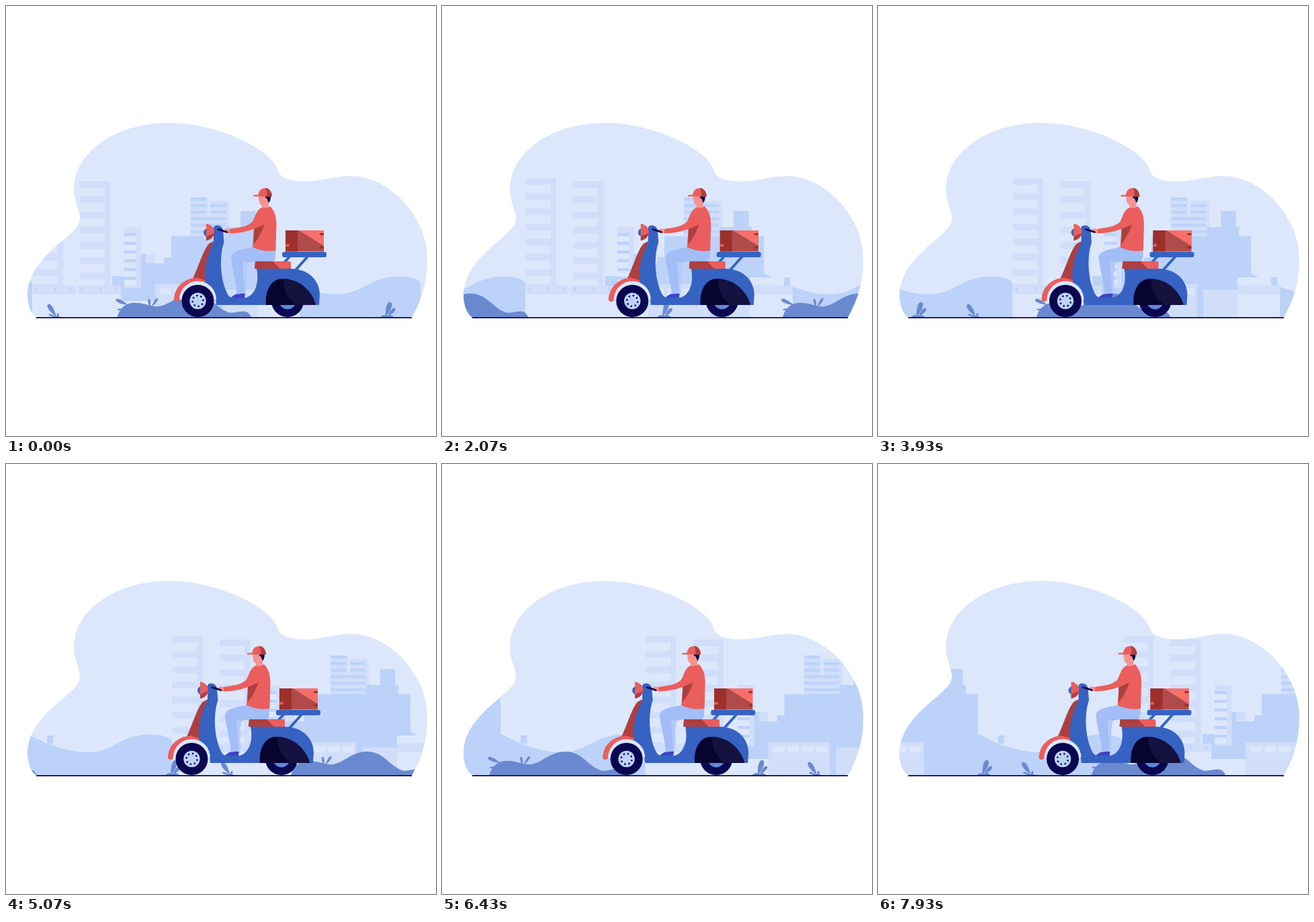
These frames come from a looping animation (640 by 640 pixels, 8000 ms). An HTML page:

```html
<!DOCTYPE html>
<html lang="en">
<head>
<meta charset="utf-8">
<title>Scooter delivery</title>
<style>
  html, body { margin: 0; width: 100%; height: 100%; overflow: hidden; background: #fff; }
  svg { display: block; width: 100vw; height: 100vh; }
</style>
</head>
<body>
<svg viewBox="0 0 640 640">
  <defs>
    <clipPath id="cloudClip"><path id="cloud" d="M45 463.5C36 457 32 443 32 430C32 397 58 371 86 348C100 335 110 328 110 316C110 304 101 292 101 272C101 222 158 174 242 174C318 174 399 216 405 246C409 258 427 261 445 261C470 261 490 253 515 253C545 253 590 275 614 324C622 339 627 358 627 378C627 410 619 437 604 463.5Z"/></clipPath>
  </defs>
  <use href="#cloud" fill="#dce7fc"/>
  <g clip-path="url(#cloudClip)">
    <g id="city"></g>
    <g id="plants" fill="#6b89d0"></g>
  </g>
  <path d="M45 463.8H604" stroke="#0a0440" stroke-width="1.7"/>
  <g clip-path="url(#cloudClip)"><path id="dash" d="M12 464H60" stroke="#0a0440" stroke-width="2"/></g>

  <g id="scooter">
    <circle cx="419" cy="439" r="24" fill="#0b0650"/>
    <circle cx="419" cy="439" r="12.5" fill="#5f86d8"/>
    <path d="M449 373L431 393M422 373L413 383" stroke="#3662c1" stroke-width="4"/>
    <!-- fender and front -->
    <path d="M277 408C285 392 294 362 302 354L309 350L304 414Q288 404 277 408Z" fill="#ae3f40"/>
    <path d="M254 436C255 419 270 408.5 284 408.5L296 412" fill="none" stroke="#ea5e5d" stroke-width="8" stroke-linecap="round"/>
    <!-- body -->
    <path d="M309 330Q310 326 315 326.5Q321 327 323 333L324.5 352C319 366 317 400 328 425Q331 434 338 434H357C372 430 377 410 373 391H423C450 391 467 408 467 430L466 445H313C313 432 305 420 297 412C293 395 299 370 309 352Z" fill="#3662c1"/>
    <path d="M258 437A27.5 27.5 0 0 1 313 437Z" fill="#dce7fc"/>
    <path d="M387 445C385 425 394 406 411 406C440 406 457 428 461 445Z" fill="#07042f"/>
    <path d="M414 406C440 408 457 428 461 445H432C418 434 411 420 414 406Z" fill="#15123f"/>
    <circle cx="285.5" cy="439" r="24" fill="#0b0650"/>
    <circle cx="285.5" cy="439" r="12.2" fill="#bcd2f9"/>
    <g id="bolts" fill="#0b0650"></g>
    <!-- headlight -->
    <circle cx="300" cy="337" r="6" fill="#3662c1"/>
    <path d="M298 324C305 325 310 330 310 336C310 343 305 348 298 349Z" fill="#ea5e5d"/>
    <path d="M298 349V343L309.500 338C309 344 304 348 298 349Z" fill="#ae3f40"/>
    <!-- seat, rack and box -->
    <path d="M371 380H422Q424 380 424 382V391H370Z" fill="#ea5e5d"/>
    <path d="M371 380H397L408 391H370Z" fill="#ae3f40"/>
    <rect x="411" y="366" width="66" height="8" rx="3" fill="#3662c1"/>
    <rect x="416" y="334" width="57" height="31.500" fill="#b04b4b"/>
    <path d="M436 334H473V357Z" fill="#f86f69"/>
    <path d="M416 334H434V365.500H416ZM467 338H473V341H467ZM467 357.500H473V361H467Z" fill="#9e302c"/>
    <path d="M416 354.500H421.500V358H416Z" fill="#ea5e5d"/>
    <!-- legs and shoe -->
    <path d="M335 434Q339 430 344 428H356L355 434Z" fill="#3b45c6"/>
    <path d="M367 359C350 362 334 365 335 375C336 390 343 410 344 429L357 427C358 412 356 395 360 382L371 380H399Q402 372 401 362Z" fill="#a3bdf6"/>
    <path d="M352 381L355 428L357 427C358 412 356 395 360 381Z" fill="#b3cafa"/>
    <!-- rider -->
    <path d="M376 283H391V298Q387 303 381 301V297C377 295 376 289 376 283Z" fill="#f5938f"/>
    <path d="M386 283H394Q394 290 391 293L389 288H386Z" fill="#0b0650"/>
    <circle cx="387" cy="287.500" r="1.800" fill="#f5938f"/>
    <path d="M368 281.500L375.500 281C376 275 380 271 386 271C392 271 396 277 396 283.500H368Z" fill="#ea5e5d"/>
    <path d="M386 271C392 271 396 277 396 283.500H388Q389 276 386 271Z" fill="#ae3f40"/>
    <path d="M333 332C345 330 358 329 366 322C371 316 371 304 381 300Q387 302 393 298C400 305 402.500 314 402.500 325L401.500 364Q384 367 367 359L369 332Q352 338 333 338.500Z" fill="#ea5e5d"/>
    <path d="M369 332L384.500 325.500Q379 342 368.500 355Z" fill="#ae3f40"/>
    <path d="M324 333Q328 330 333 332V338.500L325 337Z" fill="#f5938f"/>
    <path d="M316 332.500L329 336.500" stroke="#0b0650" stroke-width="2.800" stroke-linecap="round"/>
  </g>
</svg>
<script>
const LOOP = 8000, PERIOD = 578;
const BACK = '#dce7fc', PALE = '#d0defa', MID = '#bcd2f9';
const el = id => document.getElementById(id);
const rect = (x, y, right, bottom, fill) =>
  `<rect x="${x}" y="${y}" width="${right - x}" height="${bottom - y}" fill="${fill}"/>`;
const repeat = (count, draw) => Array.from({ length: count }, (_, i) => draw(i)).join('');
const group = (x, content) => `<g transform="translate(${x} 0)">${content}</g>`;

const hill = `<path fill="${MID}" d="M390 463V396C430 417 460 429 493 429C530 429 540 403 585 402.500C600 402.500 617 406 617 414V463Z"/>`;

const tower = (x, y) => rect(x, y, x + 45.5, 416, PALE) +
  repeat(7, i => rect(x, y + 10 + i * 22.6, x + 37, y + 22.4 + i * 22.6, BACK));

const fence = x => rect(x, 416, x + 64, 429, PALE) +
  [5, 33, 55].map(dx => rect(x + dx, 419, x + dx + 2.5, 424, MID)).join('');

// Blocks behind, then the striped towers, then the low buildings.
function skyline(withShops) {
  let out = tower(39.5, 256) + tower(110, 261) + fence(39.5) + fence(107);
  out += rect(275, 285, 301, 342, PALE) + rect(304, 290, 332, 342, PALE) + rect(300, 314, 305, 342, PALE);
  out += repeat(6, i => {
    const y = 285 + i * 9.8;
    if (i > 2) return rect(275, y, 327, y + 4, MID);
    return rect(275, y, 298, y + 4.5, MID) + (i ? rect(304, y, 327, y + 4, MID) : '');
  });
  out += rect(158, 402, 176, 416, MID) + rect(171, 416, 222, 439, MID) +
    rect(194, 369, 209, 439, MID) + rect(208, 369, 222, 383, PALE) +
    rect(208, 383, 246, 439, MID) + rect(235, 374, 247, 420, MID) +
    rect(246, 342.500, 394, 463, MID) + rect(328, 329, 376, 344, MID) + rect(349, 305, 371.500, 330, MID);
  out += rect(176, 329, 201, 420, PALE) +
    repeat(6, i => rect(176, 338 + i * 13, 194, 342.500 + i * 13, MID) +
      rect(176, 342.500 + i * 13, 194, 351 + i * 13, BACK));
  out += rect(222, 414, 313.500, 463, PALE) +
    repeat(4, i => rect(229 + i * 21.3, 420, 246 + i * 21.3, 429.500, BACK));
  if (withShops) {
    out += rect(323, 422, 374, 463, PALE) + rect(374, 404, 437, 463, BACK) + rect(374, 415.500, 437, 429, PALE);
  }
  return out + rect(424, 404, 433, 416, MID);
}

// Teardrop leaf growing from (x, y) to (x + dx, y + dy).
function leaf(x, y, dx, dy, width) {
  const len = Math.hypot(dx, dy), nx = -dy / len * width, ny = dx / len * width;
  const side = s => `${x + dx * .5 + nx * s} ${y + dy * .5 + ny * s}`;
  const tip = s => `${x + dx * 1.03 + nx * s} ${y + dy * 1.03 + ny * s}`;
  return `<path d="M${x} ${y}C${side(1)} ${tip(1)} ${x + dx} ${y + dy}C${tip(-1)} ${side(-1)} ${x} ${y}Z"/>`;
}

const bush = '<path d="M0 463C2 454 8 446 17 443C30 439 43 445 56 447C76 449 88 428 113 428C137 428 146 448 163 455C172 460 184 451 194 456Q198 459 199 463Z"/>' +
  leaf(16, 445, -18, -8, 3.5) + leaf(11, 451, -11, 1, 1.5) +
  leaf(49, 448, -2, -12, 2.5) + leaf(51, 448, 9, -13, 2.5);
const tallPlant = leaf(-2, 463, 7, -22, 5) + leaf(1, 462, 10.500, -12, 3.5) +
  '<path d="M-10 463Q-8 460 -4 460L0 461L5 460Q9 461 10 463Z"/>';
const smallPlant = leaf(2, 462, -12, -18, 4.5) + leaf(4, 463, 1, -6, 2) +
  leaf(0, 462, -9, -3, 2) + '<path d="M-5 463Q2 459 9 463Z"/>';

el('city').innerHTML =
  group(0, hill + skyline(true)) + group(-PERIOD, hill + group(7.5, skyline(false)));

el('plants').innerHTML = [-1, 0, 1, 2].map(k => group(-k * PERIOD,
  group(165.500, bush) + group(72.500, smallPlant) + group(k === 2 ? 5 : -11, tallPlant))).join('');

el('bolts').innerHTML = repeat(8, i =>
  `<circle cx="285.5" cy="431" r="1.4" transform="rotate(${i * 45} 285.5 439)"/>`);

const shift = (id, x) => el(id).setAttribute('transform', `translate(${x} 0)`);

function draw(now) {
  const t = now % LOOP;
  shift('city', t * .041);
  shift('dash', t * .041);
  shift('plants', t * .165);
  shift('scooter', -5.5 * (1 - Math.cos(Math.PI * t / 7000)));
  el('bolts').setAttribute('transform', `rotate(${-8 - t * .36} 285.5 439)`);
}

const start = performance.now();
function tick() {
  draw(performance.now() - start);
  requestAnimationFrame(tick);
}
tick();
</script>
</body>
</html>
```
